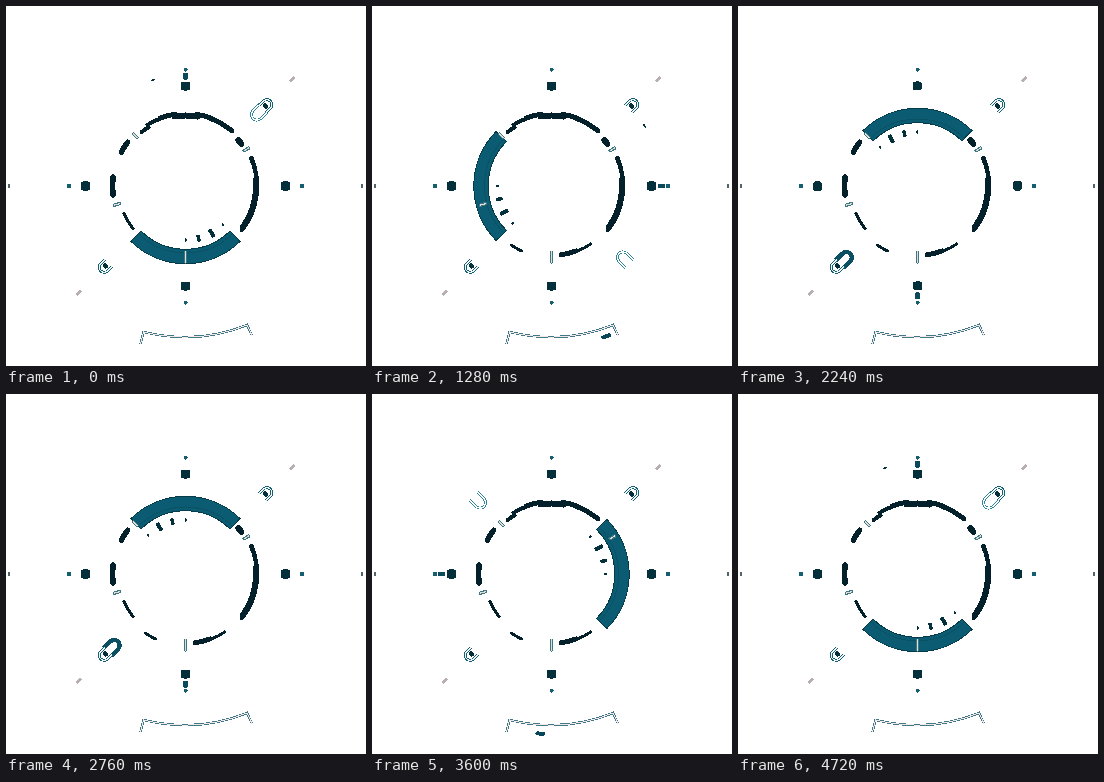
An HTML page that plays this animation: 360 px wide and 360 px high, repeating every 4.76 s.

```html
<!DOCTYPE html>
<html lang="en">
<head>
<meta charset="utf-8">
<style>
  html, body { margin: 0; height: 100%; overflow: hidden; background: #fff; }
  svg { display: block; width: 100vw; height: 100vh; shape-rendering: crispEdges; }
  path { fill: none; }
</style>
</head>
<body>
<svg viewBox="0 0 360 360">
  <g transform="translate(179.5 180)">
    <g id="segments"></g>
    <g id="dial"></g>
    <g id="fixed"></g>
    <g id="dash"><rect x="110" y="-2" width="1.5" height="4" fill="#04303c"/></g>
    <g id="pointer"><rect x="158" y="-5" width="4" height="10" rx="2" fill="#06485a"/></g>
  </g>
  <g id="base"></g>
</svg>
<script>
const LOOP = 4760;
const TURN = 300;
const STARTS = [811, 1960, 3109, 4258];
const DARK = '#04202a', NAVY = '#04303c', TEAL = '#0b5c72', CYAN = '#2f8799';
const $ = id => document.getElementById(id);

function add(parent, tag, attrs) {
  const node = document.createElementNS('http://www.w3.org/2000/svg', tag);
  for (const key in attrs) node.setAttribute(key, attrs[key]);
  return parent.appendChild(node);
}

const polar = (r, deg) => {
  const a = deg * Math.PI / 180;
  return `${(r * Math.cos(a)).toFixed(2)} ${(r * Math.sin(a)).toFixed(2)}`;
};

const arcPath = (r, from, to) => `M${polar(r, from)}A${r} ${r} 0 0 1 ${polar(r, to)}`;

function arc(parent, r, from, to, width, stroke, cap = 'butt') {
  return add(parent, 'path', {
    d: arcPath(r, from, to), stroke, 'stroke-width': width, 'stroke-linecap': cap
  });
}

// A rounded block lying along the radius at the given angle
function block(parent, r, deg, length, width, fill, rx = 1) {
  return add(parent, 'rect', {
    x: r - length / 2, y: -width / 2, width: length, height: width,
    rx, fill, transform: `rotate(${deg})`
  });
}

// Dark ring segments: radius, start angle, end angle, thickness
const segments = $('segments');
[
  [69.5, 231, 238, 4], [72, 238, 250, 4], [72.5, 250, 262, 5], [70.5, 261, 280, 6],
  [72.5, 279, 291, 5], [72, 291, 310, 5], [72.5, 208, 217, 5.5], [73, 173, 187, 5.5],
  [67.5, 141, 156, 3], [71.5, 115, 124, 3], [70, 56, 83, 3], [69.5, 69, 82, 5],
  [70, -41, -37, 6], [71.5, -23, 38, 4.5], [70.5, -5, 35, 6]
].forEach(([r, from, to, width]) => arc(segments, r, from, to, width, DARK, 'round'));

// Rotating dial
const dial = $('dial');
arc(dial, 70.5, 45, 135, 15.5, '#063c49');
arc(dial, 70.5, 45.8, 134.2, 13.5, TEAL);
arc(dial, 67, 46, 134, 1, '#0a5164');
[0, 90, 180, 270].forEach(deg => block(dial, 100, deg, 9, 9.5, NAVY, 3));
block(dial, 110, 270, 7, 4.5, '#0a4a5a');
[[90, 4, 2], [76, 7, 3.5], [61, 9, 4], [46, 3, 2]]
  .forEach(([deg, length, width]) => block(dial, 54, deg, length, width, NAVY));
const clasp = 'M110 -5.5H101A5.5 5.5 0 0 0 101 5.5H110';
const claspEdge = add(dial, 'path', { d: clasp, transform: 'rotate(-45)' });
const claspCore = add(dial, 'path', { d: clasp, transform: 'rotate(-45)', 'stroke-width': 1.4, stroke: '#fff' });

// Fixed marks
const fixed = $('fixed');
[0, 90, 180, 270].forEach(deg => block(fixed, 116.5, deg, 4, 4, '#155f70', 1.5));
const rimMarks = [0, 180].map(deg => block(fixed, 176.5, deg, 2, 4, '#52656b'));
[[90, 13], [165, 8], [225, 8], [-31, 8]].forEach(([deg, length]) => {
  block(fixed, 71, deg, length, 3.4, '#3b7784');
  block(fixed, 71, deg, length - 1, 1.2, '#e4ddd4');
});
const hook = 'M109 -5H115A5 5 0 0 1 115 5H109';
const pills = [-45, 135].map(deg => {
  const transform = `rotate(${deg})`;
  add(fixed, 'path', { d: hook, transform, stroke: '#17606f', 'stroke-width': 3 });
  add(fixed, 'path', { d: hook, transform, stroke: '#eef4f4', 'stroke-width': 1.2 });
  block(fixed, 113, deg, 4, 5, NAVY);
  return block(fixed, 151, deg, 6.5, 3, '#b9aeb4', 1.5);
});

// Lower bracket
const bracket = 'M134.500 338L137.500 326Q192 339 241 319L246 329.500';
const bracketEdge = add($('base'), 'path', { d: bracket, 'stroke-width': 2.4 });
const bracketCore = add($('base'), 'path', { d: bracket, stroke: '#f3e6e6', 'stroke-width': 1 });

const ease = p => p < .5 ? 4 * p ** 3 : 1 - (2 - 2 * p) ** 3 / 2;
const clamp = p => Math.max(0, Math.min(1, p));
const within = (t, from, to) => t >= from && t < to;

// Linear interpolation through [time, value] points
function track(t, points) {
  for (let i = 1; i < points.length; i++) {
    const [t0, v0] = points[i - 1], [t1, v1] = points[i];
    if (t <= t1) return v0 + (v1 - v0) * clamp((t - t0) / (t1 - t0));
  }
  return points[points.length - 1][1];
}

function show(node, visible) {
  node.setAttribute('visibility', visible ? 'visible' : 'hidden');
}

function draw(now) {
  const t = now % LOOP;
  const turn = STARTS.reduce((sum, start) => sum + 90 * ease(clamp((t - start) / TURN)), 0);
  dial.setAttribute('transform', `rotate(${turn})`);

  const moving = STARTS.some(start => within(t, start, start + TURN - 20));
  const solid = moving || within(turn, 179, 269);
  claspEdge.setAttribute('stroke', solid ? '#0a4f62' : CYAN);
  claspEdge.setAttribute('stroke-width', solid ? 4.5 : 3);
  show(claspCore, !solid);

  const lit = within(t, 3900, 4600);
  pills.forEach(pill => pill.setAttribute('fill', lit ? CYAN : '#b9aeb4'));
  bracketEdge.setAttribute('stroke', lit ? CYAN : '#3f7886');
  bracketEdge.setAttribute('stroke-width', lit ? 2 : 2.4);
  show(bracketCore, !lit);
  rimMarks.forEach(mark => show(mark, !within(t, 800, 1200) && !within(t, 4000, 4500)));

  const dashAngle = track(t, [[0, 253], [920, 276], [1280, 327], [1400, 345], [1401, 253]]);
  $('dash').setAttribute('transform', `rotate(${dashAngle})`);
  show($('dash'), t < 1400 || t >= 4700);
  $('pointer').setAttribute('transform',
    `rotate(${track(t, [[920, 92], [1280, 70], [3200, 96], [4200, 91]])})`);
  show($('pointer'), within(t, 1000, 1680) || within(t, 3400, 4640));
}

const begin = performance.now();
function frame() {
  draw(performance.now() - begin);
  requestAnimationFrame(frame);
}
frame();
</script>
</body>
</html>
```
